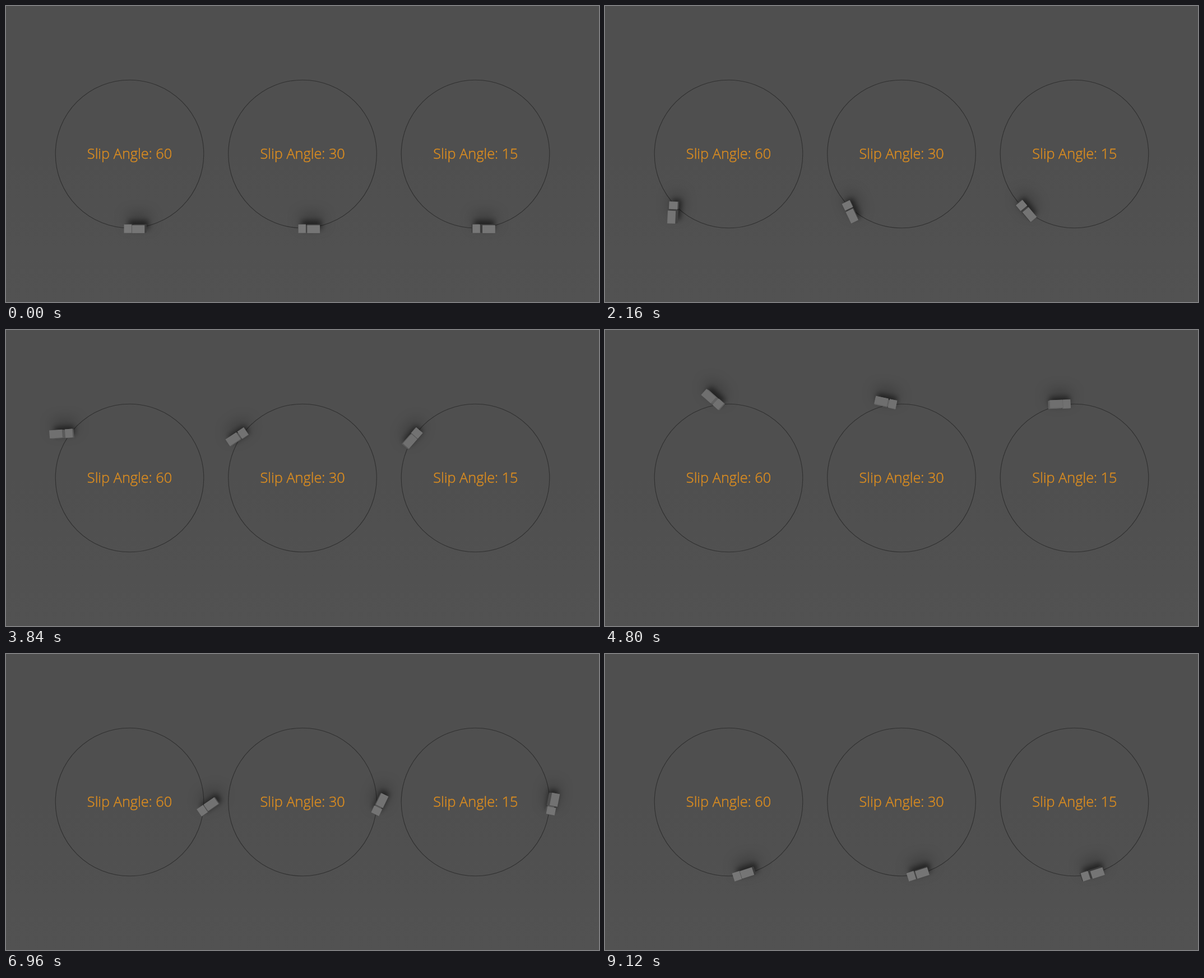
These frames come from a looping animation (1058x529 px, 9.6 s). An HTML page with a canvas:

```html
<!DOCTYPE html>
<html lang="en">
<head>
<meta charset="utf-8">
<title>Slip angle</title>
<style>
  html, body { margin: 0; width: 100%; height: 100%; overflow: hidden; background: #505050; }
  svg, canvas { position: absolute; left: 0; top: 0; display: block; }
  svg { background: linear-gradient(#4f4f4f 50%, #525252); }
  circle { fill: none; stroke: #303030; stroke-width: 1.1; }
  text {
    font: 300 25.3px "Open Sans", sans-serif; text-anchor: middle;
    fill: #da8c20; stroke: #da8c20; stroke-width: 0.5;
  }
</style>
</head>
<body>
<svg width="1058" height="529" viewBox="0 0 1058 529">
  <circle cx="220.5" cy="264.5" r="132.3"/>
  <circle cx="529" cy="264.5" r="132.3"/>
  <circle cx="837.5" cy="264.5" r="132.3"/>
  <text x="220.5" y="273">Slip Angle: 60</text>
  <text x="529.2" y="273">Slip Angle: 30</text>
  <text x="837.9" y="273">Slip Angle: 15</text>
</svg>
<canvas width="1058" height="529"></canvas>
<script>
const ctx = document.querySelector('canvas').getContext('2d');
const LOOP = 9600, STEP = 80, LAST = 109;
const VIEW = { x: 529, y: 264.5 }, RADIUS = 132.5;
const CARS = [{ x: 220.5, slip: 60 }, { x: 529, slip: 30 }, { x: 837.5, slip: 15 }];
const CAB = { offset: 0.8, length: 13.5, width: 15.4, height: 0.0078, tone: 119 };
const BOX = { offset: -19.4, length: 22.8, width: 14.2, height: 0.0138, tone: 117 };
const CHASSIS = { offset: -10, length: 14, width: 12, height: 0.004 };

const rad = deg => deg * Math.PI / 180;
const gray = v => `rgb(${v},${v},${v})`;
const smooth = (from, to, v) => {
  const u = Math.min(1, Math.max(0, (v - from) / (to - from)));
  return u * u * (3 - 2 * u);
};

// Degrees travelled clockwise from the bottom: speed up, cruise, brake.
function travel(step) {
  const speed = 3.84, ramp = 20, brakeAt = 90, brake = 0.155;
  if (step < ramp) return speed * step * step / (2 * ramp);
  const late = Math.max(0, step - brakeAt);
  return speed * (step - ramp / 2) - brake * late * late / 2;
}

// Ground point, seen from above with perspective growing with height.
function project(car, along, height) {
  const x = car.px - Math.cos(car.heading) * along;
  const y = car.py - Math.sin(car.heading) * along;
  const scale = 1 + height;
  return [VIEW.x + (x - VIEW.x) * scale, VIEW.y + (y - VIEW.y) * scale];
}

function slab(car, part, height, fill) {
  const [x, y] = project(car, part.offset, height);
  ctx.save();
  ctx.translate(x, y);
  ctx.rotate(car.heading);
  ctx.fillStyle = fill;
  ctx.fillRect(-part.length / 2, -part.width / 2, part.length, part.width);
  ctx.restore();
}

function shadow(car, blur, dx, dy, alpha) {
  const [x, y] = project(car, -13, 0);
  ctx.save();
  ctx.filter = `blur(${blur}px)`;
  ctx.translate(x + dx, y + dy);
  ctx.rotate(car.heading);
  ctx.fillStyle = `rgba(0,0,0,${alpha})`;
  ctx.fillRect(-18, -8, 36, 16);
  ctx.restore();
}

function block(car, part, side) {
  for (let h = 0.002; h < part.height; h += 0.002) slab(car, part, h, side);
  slab(car, part, part.height, gray(part.tone - 6 * car.far));
}

function drawCar({ x, slip }, step) {
  const angle = travel(step);
  const drift = 0.98 * smooth(0, 25, step) * (1 - smooth(88, LAST, step));
  const heading = Math.max(0, angle - 10) + slip * drift;
  const a = rad(angle);
  const car = {
    px: x - RADIUS * Math.sin(a),
    py: VIEW.y + RADIUS * Math.cos(a),
    heading: rad(heading),
    far: 0.5 - 0.5 * Math.cos(a)
  };
  shadow(car, 13, 3, -15, 0.38);
  shadow(car, 5, 3, -6, 0.5);
  const side = gray(62 + 36 * car.far);
  const gapShade = 0.5 + 0.5 * Math.cos(rad(heading - 50));
  slab(car, CHASSIS, CHASSIS.height, gray(104 - 48 * gapShade));
  block(car, CAB, side);
  block(car, BOX, side);
}

function render() {
  const time = performance.now() % LOOP;
  const step = Math.min(LAST, Math.max(0, Math.floor(time / STEP) - 5));
  ctx.clearRect(0, 0, 1058, 529);
  CARS.forEach(car => drawCar(car, step));
  requestAnimationFrame(render);
}
render();
</script>
</body>
</html>
```
